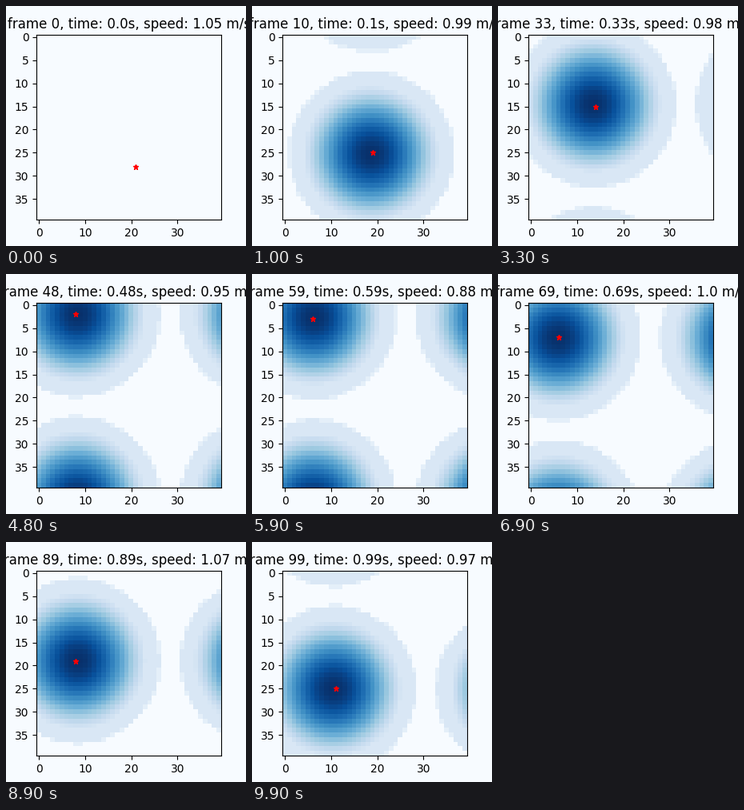
Recreate the animation shown at these times as a matplotlib script. Size 300 px wide and 300 px high, loop 10 s.

```python
import numpy as np
import matplotlib.pyplot as plt
from matplotlib.animation import FuncAnimation

N = 40          # cells per side of the torus
FRAMES = 100
REACH = 20      # bump radius in cells
PAPER = "#f7fbff"

# Key poses of the walk: step, x, y, speed
KEYS = np.array([
    (0, 21, 28, 1.05),
    (21, 16.3, 21.4, 0.95),
    (33, 13.6, 14.6, 0.98),
    (48, 8.4, 2, 0.95),
    (59, 6.3, 2.6, 0.88),
    (78, 6.55, 12.55, 1.12),
    (99, 10.6, 25, 0.97),
])
steps, poses = KEYS[:, 0], KEYS[:, 1:]
slopes = np.gradient(poses, steps, axis=0)


def glide(t):
    """Cubic Hermite curve through the key poses."""
    i = min(np.searchsorted(steps, t, side="right"), len(steps) - 1) - 1
    h = steps[i + 1] - steps[i]
    u = (t - steps[i]) / h
    return ((1 + 2 * u) * (1 - u) ** 2 * poses[i]
            + u * (1 - u) ** 2 * h * slopes[i]
            + u * u * (3 - 2 * u) * poses[i + 1]
            + u * u * (u - 1) * h * slopes[i + 1])


def ring_distance(center):
    d = np.abs(np.arange(N) - center) % N
    return np.minimum(d, N - d)


def activity(x, y):
    r = np.hypot(ring_distance(y)[:, None], ring_distance(x)[None, :])
    a = (1 + np.cos(np.pi * np.minimum(r / REACH, 1))) / 2
    # Silent surround, pale fringe and a flat outer ring
    return np.select([a < 0.023, a < 0.033, a < 0.17], [0, 0.09, 0.15], a)


fig, ax = plt.subplots(figsize=(3, 3), dpi=100, facecolor=PAPER)
image = ax.imshow(np.zeros((N, N)), cmap="Blues", vmin=0, vmax=1,
                  interpolation="nearest")
star, = ax.plot([], [], "r*", markersize=5)
ax.set(xlim=(-0.5, N - 0.5), ylim=(N - 0.5, -0.5),
       xticks=range(0, N, 10), yticks=range(0, N, 5))
title = ax.set_title("")


def update(k):
    x, y, speed = glide(k)
    image.set_data(activity(x, y) if k else np.zeros((N, N)))
    star.set_data([round(x) % N], [round(y) % N])
    title.set_text(f"frame {k}, time: {round(k * 0.01, 2)}s, "
                   f"speed: {round(float(speed), 2)} m/s")
    return image, star, title


anim = FuncAnimation(fig, update, frames=FRAMES, interval=100,
                     repeat=True, repeat_delay=0)
plt.show()
```
